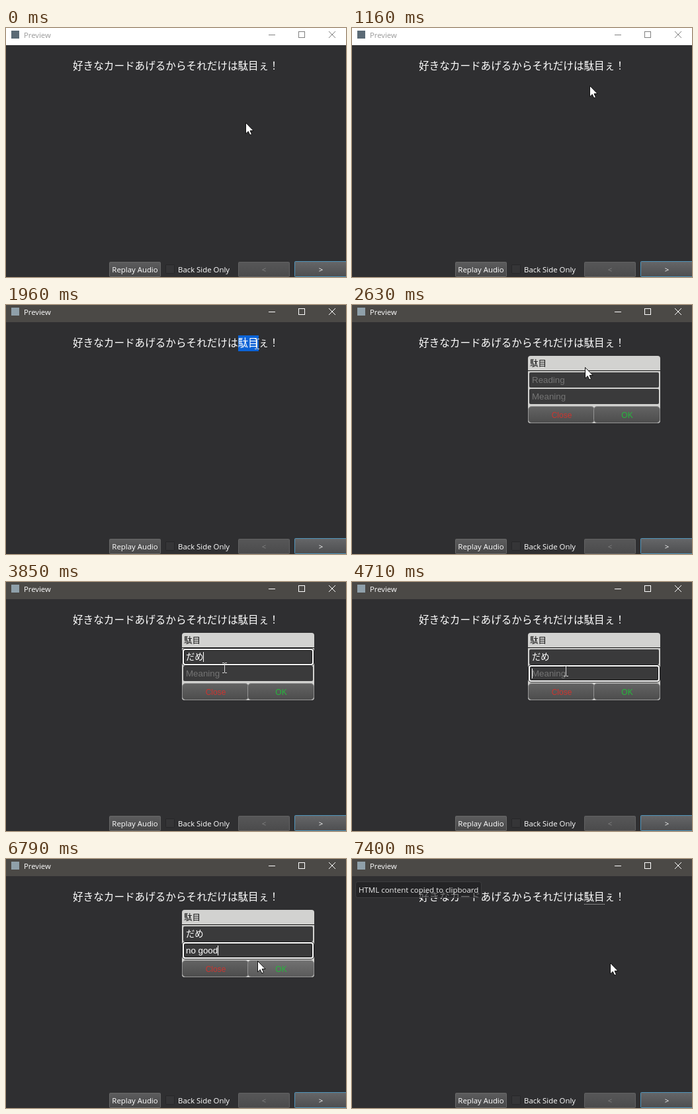
These frames come from a looping animation (514x377 px, 8 s). An HTML page with a canvas:

```html
<!DOCTYPE html>
<html lang="ja">
<head>
<meta charset="utf-8">
<style>
html, body { margin: 0; width: 100%; height: 100%; overflow: hidden; background: #2f2f31; }
canvas { display: block; }
</style>
</head>
<body>
<canvas id="stage" width="514" height="377"></canvas>
<script>
const ctx = document.getElementById('stage').getContext('2d');
const LOOP = 8000;
const UI = '"Open Sans", "Noto Sans", sans-serif';
const CJK = '"Noto Sans CJK JP", "Noto Sans CJK", sans-serif';
const FIELD = '"Liberation Sans", "Noto Sans CJK JP", sans-serif';
const SENTENCE = '好きなカードあげるからそれだけは駄目ぇ！';
const SIZE = 15.6;
const WORD_X = 257 + 6 * SIZE;

// Pointer path: time, x, y
const PATH = [
  [0, 362, 143], [780, 362, 143], [1160, 359, 87], [1340, 354, 59],
  [1770, 354, 59], [1960, 379, 59], [2520, 379, 59], [2630, 352, 94],
  [2770, 352, 94], [2890, 339, 115], [3610, 339, 115], [3850, 330, 130],
  [3990, 325, 135], [4419, 325, 135], [4420, 323, 135], [6510, 323, 135],
  [6840, 390, 157], [LOOP, 390, 157]
];
// Field contents over time
const READING = [[3110, ''], [3610, 'd'], [3680, 'だ'], [3760, 'だm'], [3830, 'だめ']];
const MEANING = [[4200, ''], [4800, 'n'], [4970, 'no'], [5100, 'no '], [5260, 'no g'],
  [5370, 'no go'], [5480, 'no goo'], [5600, 'no good']];

function rect(x, y, w, h, fill) {
  ctx.fillStyle = fill;
  ctx.fillRect(x, y, w, h);
}

function box(x, y, w, h, r, fill, stroke, line = 1) {
  ctx.beginPath();
  ctx.roundRect(x, y, w, h, r);
  if (fill) { ctx.fillStyle = fill; ctx.fill(); }
  if (stroke) { ctx.strokeStyle = stroke; ctx.lineWidth = line; ctx.stroke(); }
}

function text(s, x, y, color, size, family, align = 'left', weight = 400) {
  ctx.font = `${weight} ${size}px ${family}`;
  ctx.textAlign = align;
  ctx.fillStyle = color;
  ctx.fillText(s, x, y);
}

function shade(y, h, top, bottom) {
  const g = ctx.createLinearGradient(0, y, 0, y + h);
  g.addColorStop(0, top);
  g.addColorStop(1, bottom);
  return g;
}

function strokeLines(color, ...lines) {
  ctx.beginPath();
  for (const [x1, y1, x2, y2] of lines) { ctx.moveTo(x1, y1); ctx.lineTo(x2, y2); }
  ctx.strokeStyle = color;
  ctx.lineWidth = 1;
  ctx.stroke();
}

function pointerAt(t) {
  const i = PATH.findIndex(p => p[0] > t);
  const [t0, x0, y0] = PATH[i - 1], [t1, x1, y1] = PATH[i];
  const k = (t - t0) / (t1 - t0);
  return [Math.round(x0 + (x1 - x0) * k), Math.round(y0 + (y1 - y0) * k)];
}

function titleBar(active) {
  rect(0, 0, 514, 26, active ? '#4b4946' : '#ffffff');
  rect(8, 4, 12, 12, active ? '#8fa0aa' : '#5b6a75');
  text('Preview', 27, 15, active ? '#ffffff' : '#999999', 11.3, UI);
  const c = active ? '#ffffff' : '#808080';
  strokeLines(c, [397, 10.5, 407, 10.5], [488, 5, 498, 15], [498, 5, 488, 15]);
  ctx.strokeRect(442.5, 5.5, 9, 9);
}

function toolbar() {
  const face = shade(354, 22, '#5d5d5e', '#474748');
  box(156.5, 354.5, 77, 22, 1, face, '#686868');
  text('Replay Audio', 195, 370, '#ffffff', 11.4, UI, 'center');
  box(241.5, 358.5, 13, 13, 1, '#353537', '#262628');
  text('Back Side Only', 260, 370, '#ffffff', 11.4, UI);
  box(351.5, 354.5, 77, 22, 1, shade(354, 22, '#575758', '#4b4b4c'), '#626263');
  text('<', 390, 370, '#858585', 11.4, UI, 'center');
  box(436.5, 353.5, 80, 23, 1, shade(353, 24, '#666769', '#4d4e50'), '#5197bd');
  text('>', 476, 370, '#ffffff', 11.4, UI, 'center');
}

function sentence(t, pointerX) {
  if (t >= 1770 && t < 3110) {
    const count = Math.max(0, Math.min(2, Math.round((pointerX - WORD_X) / SIZE)));
    if (count) rect(351, 46, Math.round(count * SIZE), 24, '#0b63d6');
  }
  text(SENTENCE, 257 - 10 * SIZE, 63, '#ffffff', SIZE, CJK, 'left', 500);
  if (t >= 7400) for (let x = 351; x < 382; x += 2) rect(x, 68, 1, 1, '#d0d0d0');
}

function focusRing(x, y, w, h) {
  box(x, y, w, h, 3, null, '#1c1c1c', 4);
  box(x, y, w, h, 3, null, '#ffffff', 2);
}

function field(y, hint, states, focused, t) {
  box(268, y, 196, 23, 2, '#3a3a3b');
  if (focused) focusRing(268, y, 196, 23);
  const [since, value] = states.filter(s => s[0] <= t).pop() || [0, ''];
  if (value) text(value, 272, y + 16, '#ffffff', 13.33, FIELD, 'left', 500);
  else text(hint, 272, y + 16, '#757575', 13.33, FIELD);
  if (focused && Math.floor((t - since) / 530) % 2 === 0) {
    ctx.font = `13.33px ${FIELD}`;
    rect(Math.floor(272 + ctx.measureText(value).width), y + 4, 1, 15, '#ffffff');
  }
}

function popupButton(x, label, color, top, bottom) {
  box(x + .5, 153.5, 100, 25, 5, shade(153, 26, top, bottom), '#959595');
  text(label, x + 51, 171, color, 12, FIELD, 'center');
}

function popup(t, [px, py]) {
  box(266, 77, 200, 102, 4, '#d2d2d0');
  text('駄目', 269, 93, '#111111', 12.5, CJK);
  rect(266, 99, 200, 1, '#111111');
  field(102, 'Reading', READING, t >= 3110 && t < 4150, t);
  field(127, 'Meaning', MEANING, t >= 4150 && t < 7170, t);
  popupButton(266, 'Close', '#cb3530', '#646464', '#4c4c4c');
  const hover = px > 366 && py > 152;
  const pressed = t >= 7170 && t < 7220;
  popupButton(365, 'OK', '#25b83b', pressed ? '#484848' : hover ? '#727272' : '#646464',
    hover && !pressed ? '#5a5a5a' : '#4c4c4c');
  if (t >= 7170) box(366, 153, 100, 26, 4, null, '#ffffff', 2);
}

function toast() {
  box(5.5, 34.5, 190, 24, 3, 'rgba(30,30,31,.62)', '#3d3d3f');
  text('HTML content copied to clipboard', 10, 51, '#eeeeee', 11.5, UI);
}

function pointer(t, [x, y]) {
  const overText = y > 46 && y < 70;
  const overField = t >= 2300 && t < 7400 && y > 101 && y < 151;
  if (overText || overField) {
    strokeLines('#d8d8d8', [x + .5, y - 7, x + .5, y + 7],
      [x - 3, y - 7.5, x, y - 7.5], [x + 1, y - 7.5, x + 4, y - 7.5],
      [x - 3, y + 7.5, x, y + 7.5], [x + 1, y + 7.5, x + 4, y + 7.5]);
    return;
  }
  const p = new Path2D('M0 0V16.5L3.8 13L6.3 18.6L9 17.4L6.6 12H11.6Z');
  ctx.save();
  ctx.translate(x + .5, y + .5);
  ctx.fillStyle = '#ffffff';
  ctx.fill(p);
  ctx.strokeStyle = '#101010';
  ctx.lineWidth = 1;
  ctx.stroke(p);
  ctx.restore();
}

function draw(now) {
  const t = now % LOOP;
  const at = pointerAt(t);
  rect(0, 0, 514, 377, '#2f2f31');
  titleBar(t >= 1610);
  toolbar();
  sentence(t, at[0]);
  if (t >= 2300 && t < 7400) popup(t, at);
  if (t >= 7400) toast();
  pointer(t, at);
}

let start;
function tick(now) {
  start ??= now;
  draw(now - start);
  requestAnimationFrame(tick);
}
requestAnimationFrame(tick);
</script>
</body>
</html>
```
